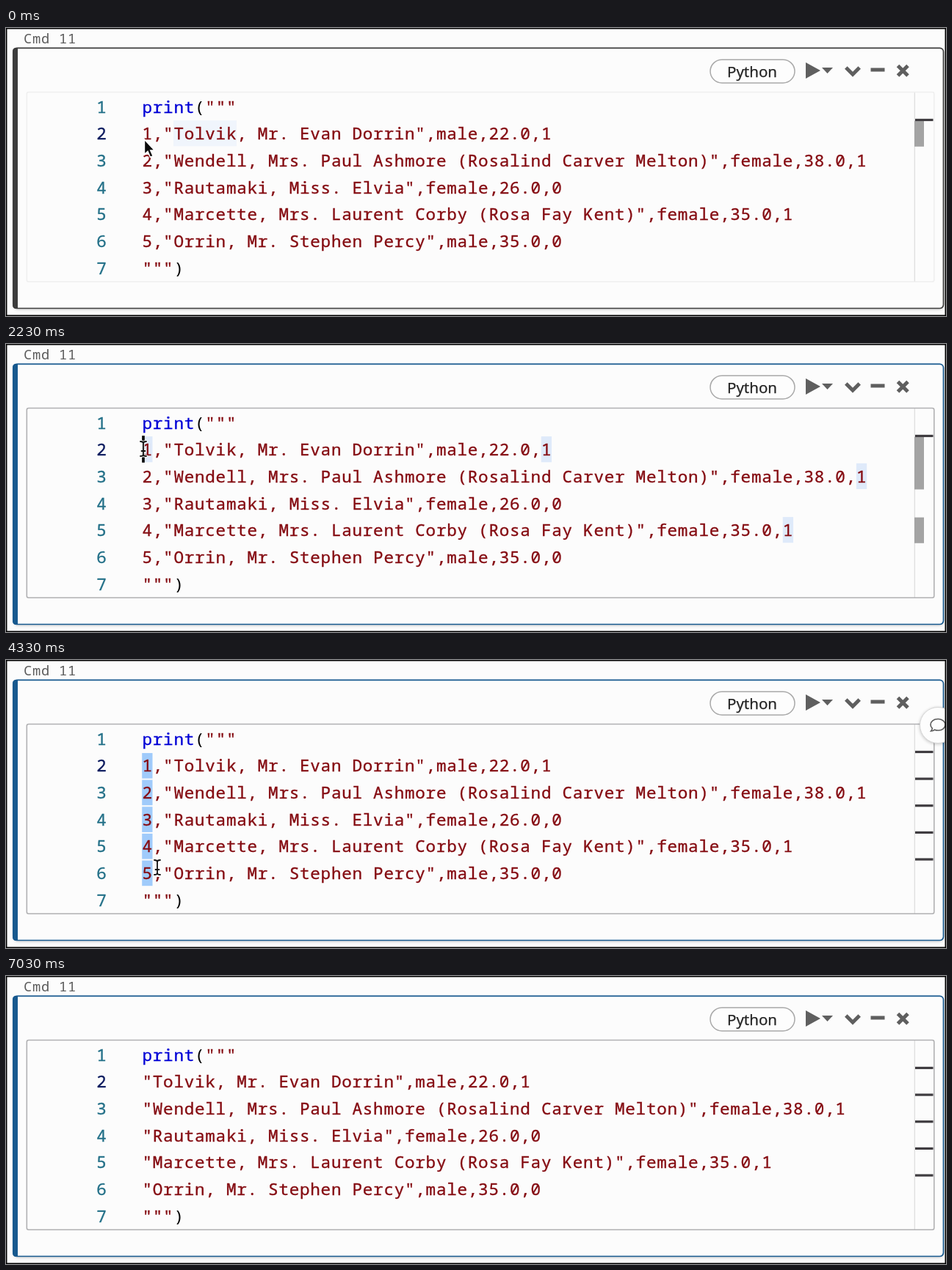
These frames come from a looping animation (1280 by 393 pixels, 7060 ms). An HTML page:

```html
<!DOCTYPE html>
<html lang="en">
<head>
<meta charset="utf-8">
<title>Notebook cell: column selection</title>
<style>
  html, body { margin: 0; width: 100%; height: 100%; overflow: hidden; background: #fcfcfc; }
  svg { display: block; width: 1280px; height: 393px; }
  .code { font: 22.6px "Noto Sans Mono", "DejaVu Sans Mono", monospace; letter-spacing: .744px; stroke-width: .35; }
  .cmd { font: 18.8px "Noto Sans Mono", monospace; letter-spacing: .72px; fill: #5c5c5c; }
  .lang { font: 20.5px "Noto Sans", "Open Sans", sans-serif; fill: #242424; stroke: #242424; stroke-width: .25; text-anchor: middle; }
  .num { fill: #237088; stroke: #237088; }
  .num.now { fill: #0b1a5e; stroke: #0b1a5e; }
  .str { fill: #850c12; stroke: #850c12; }
  .key { fill: #0000d6; stroke: #0000d6; }
  .icon { fill: #5f5f5f; }
  .stroke { fill: none; stroke: #5f5f5f; stroke-width: 5; }
  .word { fill: #dfeafa; }
  .sel { fill: #a0cbfb; }
  .hit { fill: #a3a3a3; }
  .mark { fill: #3f3c40; }
  #cell { --edge: #3c3c3c; }
  #cell.focus { --edge: #17598f; }
  #frame { fill: #fcfcfc; stroke: var(--edge); stroke-width: 1.7; }
  #bar { fill: var(--edge); }
  #editor { fill: none; stroke: #efefef; stroke-width: 1.6; }
  #cell.focus #editor { stroke: #b1b1b3; }
</style>
</head>
<body>
<svg viewBox="0 0 1280 393" xmlns="http://www.w3.org/2000/svg">
  <defs>
    <filter id="soft" x="-50%" y="-50%" width="200%" height="200%">
      <feGaussianBlur stdDeviation="2"/>
    </filter>
  </defs>
  <rect width="1280" height="393" fill="#fcfcfc"/>
  <text class="cmd" x="24" y="21">Cmd 11</text>

  <g id="cell">
    <rect x="11" y="30" width="1265" height="354" rx="5" fill="#000" opacity=".22" filter="url(#soft)"/>
    <rect id="frame" x="9.8" y="27.3" width="1266.7" height="355.2" rx="5"/>
    <path id="bar" d="M16 27H14Q9 27 9 32V378Q9 383 14 383H16Z"/>

    <rect x="959" y="43.2" width="115" height="31.8" rx="15.9" fill="#fdfdfd" stroke="#a9a9a9" stroke-width="1.5"/>
    <text class="lang" x="1016" y="67">Python</text>
    <path class="icon" d="M1089 47L1109 58L1089 69ZM1111 54H1126L1118.500 62ZM1177.500 54.600H1196.500V59.400H1177.500Z"/>
    <path class="stroke" d="M1143.800 54L1153 63.200L1162.200 54M1214.500 51.500L1228 65M1228 51.500L1214.500 65"/>

    <path d="M1237.300 88V346" stroke="#dcdcdc" stroke-width="1.2"/>
    <g id="back"></g>
    <g id="lines" class="code"></g>
    <g id="front"></g>
    <rect id="editor" x="28.3" y="87.5" width="1235.500" height="258.800" rx="2.5"/>
  </g>

  <g id="bubble">
    <circle cx="1269" cy="90" r="25" fill="#000" opacity=".22" filter="url(#soft)"/>
    <circle cx="1269" cy="89" r="24.5" fill="#fdfdfd" stroke="#d6d6d6"/>
    <path d="M1269 80.500C1275 80.500 1279 84 1279 88.300S1275 96 1269 96C1267.300 96 1266 95.800 1264.600 95.200C1263 96.500 1261.200 97 1259.500 97C1260.600 95.800 1261.200 94.500 1261.300 93.200C1259.800 91.800 1259 90.200 1259 88.300C1259 84 1263 80.500 1269 80.500Z" fill="none" stroke="#5a5a5a" stroke-width="1.6"/>
  </g>

  <path id="arrow" d="M0 0V20.500L4.600 16.300L8 24.300L11.800 22.700L8.400 15H14Z" fill="#0a0a0a" stroke="#fff" stroke-width="1.6"/>
  <g id="beam" fill="none" stroke-linecap="round">
    <path d="M-4 -10Q0 -10 0 -7.500Q0 -10 4 -10M0 -7.500V7.500M-4 10Q0 10 0 7.500Q0 10 4 10M-2.500 3H2.500" stroke="#fff" stroke-width="4" opacity=".85"/>
    <path d="M-4 -10Q0 -10 0 -7.500Q0 -10 4 -10M0 -7.500V7.500M-4 10Q0 10 0 7.500Q0 10 4 10M-2.500 3H2.500" stroke="#111" stroke-width="1.8"/>
  </g>
  <rect x=".7" y=".7" width="1278.600" height="391.600" fill="none" stroke="#000" stroke-width="1.5"/>
</svg>

<script>
const LOOP = 7060, LEFT = 185.2, CHAR = 14.304, TOP = 88.5, ROW = 36.65;
// Moments of the story, in ms
const FOCUS = 500, CLICK = 1800, DRAG = 2900, DROP = 3550, EXTEND = 4630, REMOVE = 5130;

const records = [
  '1,"Tolvik, Mr. Evan Dorrin",male,22.0,1',
  '2,"Wendell, Mrs. Paul Ashmore (Rosalind Carver Melton)",female,38.0,1',
  '3,"Rautamaki, Miss. Elvia",female,26.0,0',
  '4,"Marcette, Mrs. Laurent Corby (Rosa Fay Kent)",female,35.0,1',
  '5,"Orrin, Mr. Stephen Percy",male,35.0,0'
];

const $ = id => document.getElementById(id);
const colX = c => LEFT + c * CHAR;
const rowY = r => TOP + r * ROW;
const clamp = v => Math.min(1, Math.max(0, v));
const ease = v => v * v * (3 - 2 * v);
const mix = (a, b, p) => a + (b - a) * p;
const show = (el, on) => el.setAttribute('visibility', on ? 'visible' : 'hidden');

function add(parent, tag, attrs, text) {
  const el = document.createElementNS('http://www.w3.org/2000/svg', tag);
  for (const k in attrs) el.setAttribute(k, attrs[k]);
  if (text) el.textContent = text;
  return parent.appendChild(el);
}
const box = (parent, cls, x, y, width, height) =>
  add(parent, 'rect', { class: cls, x, y, width, height });
const word = (row, col, len) =>
  box($('back'), 'word', colX(col), rowY(row) + 1, len * CHAR, ROW - 1.5);
const hit = (row, count) =>
  box($('back'), 'hit', 1237, rowY(row) + 1.5, 13, count * ROW - 1.5);

function codeLine(row, parts) {
  const y = rowY(row) + 27.2;
  add($('lines'), 'text', { class: row === 1 ? 'num now' : 'num', x: 137.5 - CHAR, y }, String(row + 1));
  const line = add($('lines'), 'text', { x: LEFT + .3, y });
  return parts.map(([cls, text]) => add(line, 'tspan', { class: cls }, text));
}

codeLine(0, [['key', 'print'], ['', '('], ['str', '"""']]);
const rows = records.map((text, i) => {
  const r = i + 1;
  return {
    r, text,
    span: codeLine(r, [['str', text]])[0],
    sel: box($('back'), 'sel', LEFT, rowY(r) + 1.8, CHAR, ROW - 2),
    caret: box($('front'), 'caret', 0, rowY(r), 3.6, ROW),
    mark: box($('front'), 'mark', 1238, rowY(r) - 1.3, 24.5, 3.2)
  };
});
codeLine(6, [['str', '"""'], ['', ')']]);

const nameHits = [word(1, 3, 6), hit(1, 1)];
const endCol = r => records[r - 1].length - 1;
const oneHits = [
  word(1, 0, 1), ...[1, 2, 4].map(r => word(r, endCol(r), 1)),
  hit(1, 2), hit(4, 1)
];

function pointer(t) {
  const up = ease(clamp((t - FOCUS) / 350));
  const drag = clamp((t - DRAG) / (DROP - DRAG));
  return {
    x: mix(188.4, 187, up) + 19 * ease(clamp((drag - .4) / .6)),
    y: mix(152, 143, up) + 140 * ease(drag)
  };
}

function render(t) {
  const p = pointer(t);
  const focused = t >= FOCUS, clicked = t >= CLICK, removed = t >= REMOVE;
  const last = Math.max(1, Math.min(5, Math.floor((p.y - TOP) / ROW)));
  const over = p.x > LEFT + CHAR / 2 ? 1 : 0;
  const selCol = removed ? 0 : t >= EXTEND ? 2 : t >= DRAG ? over : 0;
  const col = clicked ? selCol : 5;

  const dragging = t >= DRAG && t < DROP;
  const since = [REMOVE, EXTEND, DROP, CLICK, FOCUS].find(e => t >= e) || 0;
  const lit = focused && (dragging || Math.floor((t - since) / 500) % 2 === 0);

  $('cell').classList.toggle('focus', focused);
  for (const row of rows) {
    const active = row.r <= last;
    const text = removed ? row.text.slice(2) : row.text;
    if (row.span.textContent !== text) row.span.textContent = text;
    row.caret.setAttribute('x', Math.max(LEFT, colX(col) - 1.4));
    show(row.caret, active && lit);
    show(row.mark, active);
    row.sel.setAttribute('width', selCol * CHAR);
    show(row.sel, active && selCol > 0);
  }

  nameHits.forEach(el => show(el, !clicked));
  nameHits[0].setAttribute('opacity', focused ? 1 : .45);
  const ones = t >= CLICK + 250 && last === 1 && !selCol;
  oneHits.forEach(el => show(el, ones));
  show($('bubble'), selCol > 0);

  const at = `translate(${p.x} ${p.y})`;
  $('arrow').setAttribute('transform', at);
  $('beam').setAttribute('transform', at);
  show($('arrow'), !focused);
  show($('beam'), focused && t < EXTEND);
}

const start = performance.now();
function tick() {
  render((performance.now() - start) % LOOP);
  requestAnimationFrame(tick);
}
render(0);
requestAnimationFrame(tick);
</script>
</body>
</html>
```
